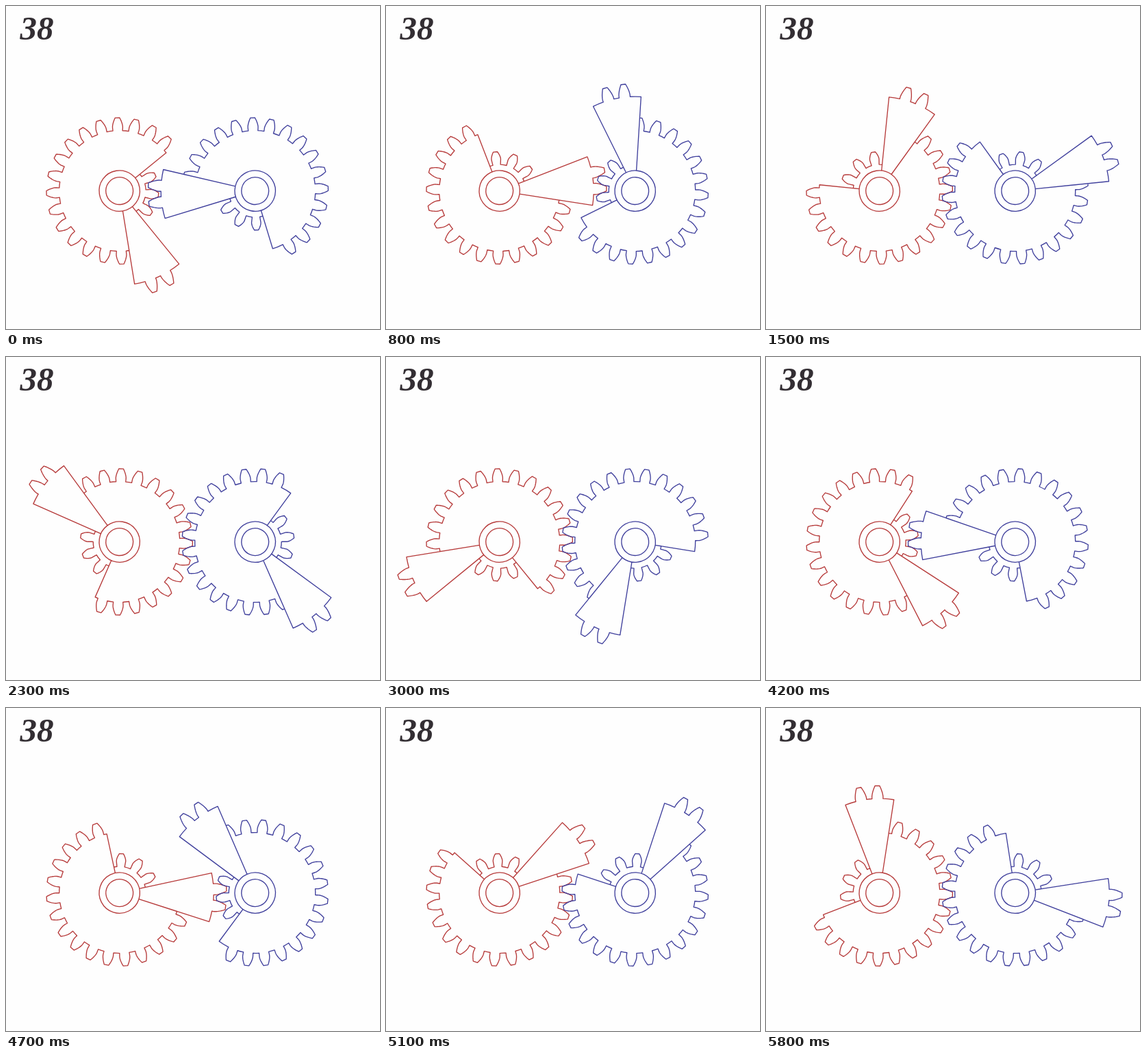
An HTML page with a canvas for the animation above (5.9 s loop, 546 by 471 pixels).

```html
<!DOCTYPE html>
<html lang="en">
<head>
<meta charset="utf-8">
<title>Variable ratio gears</title>
<style>
  html, body { margin: 0; width: 100%; height: 100%; overflow: hidden; background: #fefefe; }
  canvas { position: absolute; left: 0; top: 0; }
  #label {
    position: absolute; left: 20.5px; top: 0; margin: 0;
    font: italic bold 49px/65px "Liberation Serif", "Times New Roman", serif;
    color: #332e33;
  }
</style>
</head>
<body>
<canvas id="stage" width="546" height="471"></canvas>
<p id="label">38</p>
<script>
const ctx = document.getElementById('stage').getContext('2d');
const RAD = Math.PI / 180;
const STEP = 100, STEPS = 59;
const MODULE = 8.25, ADDENDUM = 7.7, DEDENDUM = 11;
const PRESSURE = 20 * RAD;
const HUB = 29.7, BORE = 19.9;
const CENTER_Y = 269.6;

const involute = a => Math.tan(a) - a;
const series = (first, step, count) => Array.from({ length: count }, (_, i) => first + i * step);

// Sectors run clockwise from the end of the long wedge; angles in degrees.
function makeSectors(evenTeeth) {
  return [
    { radius: 99, from: 0, to: 240, teeth: evenTeeth },
    { radius: 49.5, from: 240, to: 330, teeth: [255, 285, 315] },
    { radius: 148.5, from: 330, to: 360, teeth: [340, 350] }
  ];
}

const red = { x: 165.7, color: '#b63a3a', sectors: makeSectors(series(7.5, 15, 16)) };
const blue = { x: 363.7, color: '#3f3f9c', sectors: makeSectors(series(0, 15, 16)) };

// Half the angular thickness of a tooth at radius r.
function halfTooth(pitchRadius, r) {
  const base = pitchRadius * Math.cos(PRESSURE);
  const atBase = Math.PI * MODULE / (4 * pitchRadius) + involute(PRESSURE);
  return r > base ? atBase - involute(Math.acos(base / r)) : atBase;
}

function polar(r, a) {
  ctx.lineTo(r * Math.cos(a), r * Math.sin(a));
}

function traceTooth(radius, mid, trailingOnly) {
  const root = radius - DEDENDUM, tip = radius + ADDENDUM, parts = 12;
  const at = i => root + (tip - root) * i / parts;
  if (trailingOnly) {
    polar(tip, mid);
  } else {
    const start = mid - halfTooth(radius, root);
    polar(root, start);
    for (let i = 1; i <= parts; i++) polar(at(i), mid - halfTooth(radius, at(i)));
  }
  for (let i = parts; i >= 0; i--) polar(at(i), mid + halfTooth(radius, at(i)));
  return mid + halfTooth(radius, root);
}

function traceSector({ radius, from, to, teeth }) {
  const root = radius - DEDENDUM;
  let angle = from * RAD;
  ctx.moveTo(HUB * Math.cos(angle), HUB * Math.sin(angle));
  polar(root, angle);
  for (const tooth of teeth) {
    const mid = tooth * RAD, cut = tooth === from;
    if (!cut) ctx.arc(0, 0, root, angle, mid - halfTooth(radius, root));
    angle = traceTooth(radius, mid, cut);
  }
  ctx.arc(0, 0, root, angle, to * RAD);
  polar(HUB, to * RAD);
}

function circle(r) {
  ctx.moveTo(r, 0);
  ctx.arc(0, 0, r, 0, 2 * Math.PI);
}

function drawGear(gear, turn) {
  ctx.save();
  ctx.translate(gear.x, CENTER_Y);
  ctx.rotate(turn * RAD);
  ctx.beginPath();
  gear.sectors.forEach(traceSector);
  circle(HUB);
  circle(BORE);
  ctx.strokeStyle = gear.color;
  ctx.lineWidth = 1.35;
  ctx.lineJoin = 'round';
  ctx.stroke();
  ctx.restore();
}

// Driven angle for a drive angle: ratio 1, then 1/3, then 3.
function driven(a) {
  if (a < 240) return a - 60;
  if (a < 330) return 180 + (a - 240) / 3;
  return 210 + (a - 330) * 3;
}

function draw(time) {
  const step = Math.floor(time / STEP) % STEPS;
  const drive = (279.2 + 9 * step) % 360;
  ctx.clearRect(0, 0, 546, 471);
  drawGear(red, -drive);
  drawGear(blue, driven(drive));
}

function tick() {
  draw(performance.now());
  requestAnimationFrame(tick);
}
tick();
</script>
</body>
</html>
```
